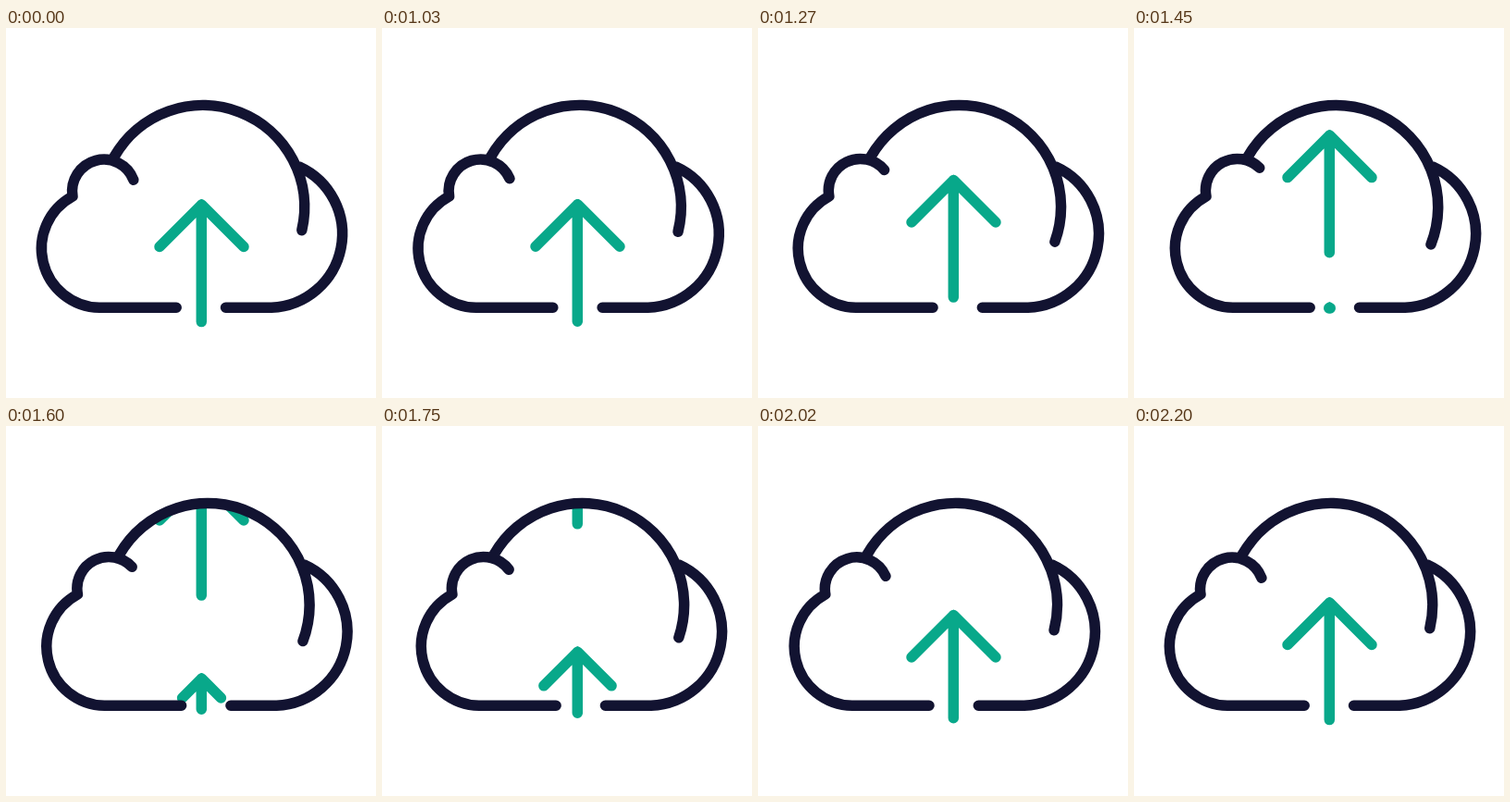
An HTML page for the animation above (2230 ms loop, 400 by 400 pixels).

```html
<!DOCTYPE html>
<html lang="en">
<head>
<meta charset="utf-8">
<title>Cloud upload</title>
<style>
  html, body { margin: 0; height: 100%; overflow: hidden; background: #fff; }
  svg { display: block; width: 100%; height: 100%; }
  path { fill: none; stroke-width: 11.5; stroke-linecap: round; stroke-linejoin: round; }
  .arrow { stroke: #08a88a; }
  .cloud { stroke: #121331; }
</style>
</head>
<body>
<svg viewBox="0 0 400 400">
  <clipPath id="inside">
    <path id="mask" d="M102.7 400V193.5a110 110 0 0 1 220 0V400z"/>
  </clipPath>
  <g clip-path="url(#inside)"><path id="leaving" class="arrow"/></g>
  <path id="arriving" class="arrow"/>
  <path id="cloud" class="cloud"/>
</svg>
<script>
const LOOP = 2230, START = 1000, PEAK = 1450, END = 2200, STEP = 30;
const $ = id => document.getElementById(id);
const clamp = x => Math.min(1, Math.max(0, x));
const easeOut = x => 1 - (1 - clamp(x)) ** 1.5;

const onCircle = (cx, cy, r, degrees) => {
  const a = degrees * Math.PI / 180;
  return `${cx + r * Math.cos(a)} ${cy + r * Math.sin(a)}`;
};

const arrowPath = (tip, bottom, arm) =>
  `M211.3 ${bottom}V${tip}M${211.5 - arm} ${tip + arm}L211.5 ${tip}L${211.5 + arm} ${tip + arm}`;

// sway runs from 0 (rest) to 1 (furthest right)
const cloudPath = sway => {
  const bumpEnd = onCircle(105.5, 175.5, 34.3, -19.2 - 25.8 * sway);
  const arch = angle => onCircle(212.7, 193.5, 110, angle);
  return `M184.2 302.3H101A64 64 0 0 1 72 182A34.3 34.3 0 0 1 ${bumpEnd}` +
    `M${arch(209.6)}A110 110 0 0 1 ${arch(13.2 + 8.4 * sway)}` +
    `M317 150A79.8 79.8 0 0 1 287 302.3H237.5`;
};

function draw(t) {
  const sway = t < PEAK
    ? Math.sin(clamp((t - START) / (PEAK - START)) * Math.PI / 2)
    : (1 + Math.cos(clamp((t - PEAK) / (END - PEAK)) * Math.PI)) / 2;
  const shift = `translate(${6 * sway} 0)`;
  $('cloud').setAttribute('d', cloudPath(sway));
  $('cloud').setAttribute('transform', shift);
  $('mask').setAttribute('transform', shift);

  const rise = 134.5 * (Math.max(0, t - START) / 600) ** 2.034;
  $('leaving').setAttribute('d', arrowPath(191 - rise, 317.6 - rise, 45.5));

  // the arms open slightly before the shaft grows
  const age = t - PEAK + 5;
  const grow = easeOut((age - 20) / (END - PEAK - 15));
  $('arriving').setAttribute('d', age < 0 ? '' :
    arrowPath(302.2 - 111.2 * grow, 302.2 + 15.4 * grow, 45.5 * easeOut(age / 460)));
}

function frame() {
  const t = performance.now() % LOOP;
  draw(START + Math.max(0, Math.floor((t - START) / STEP)) * STEP);
  requestAnimationFrame(frame);
}
frame();
</script>
</body>
</html>
```
